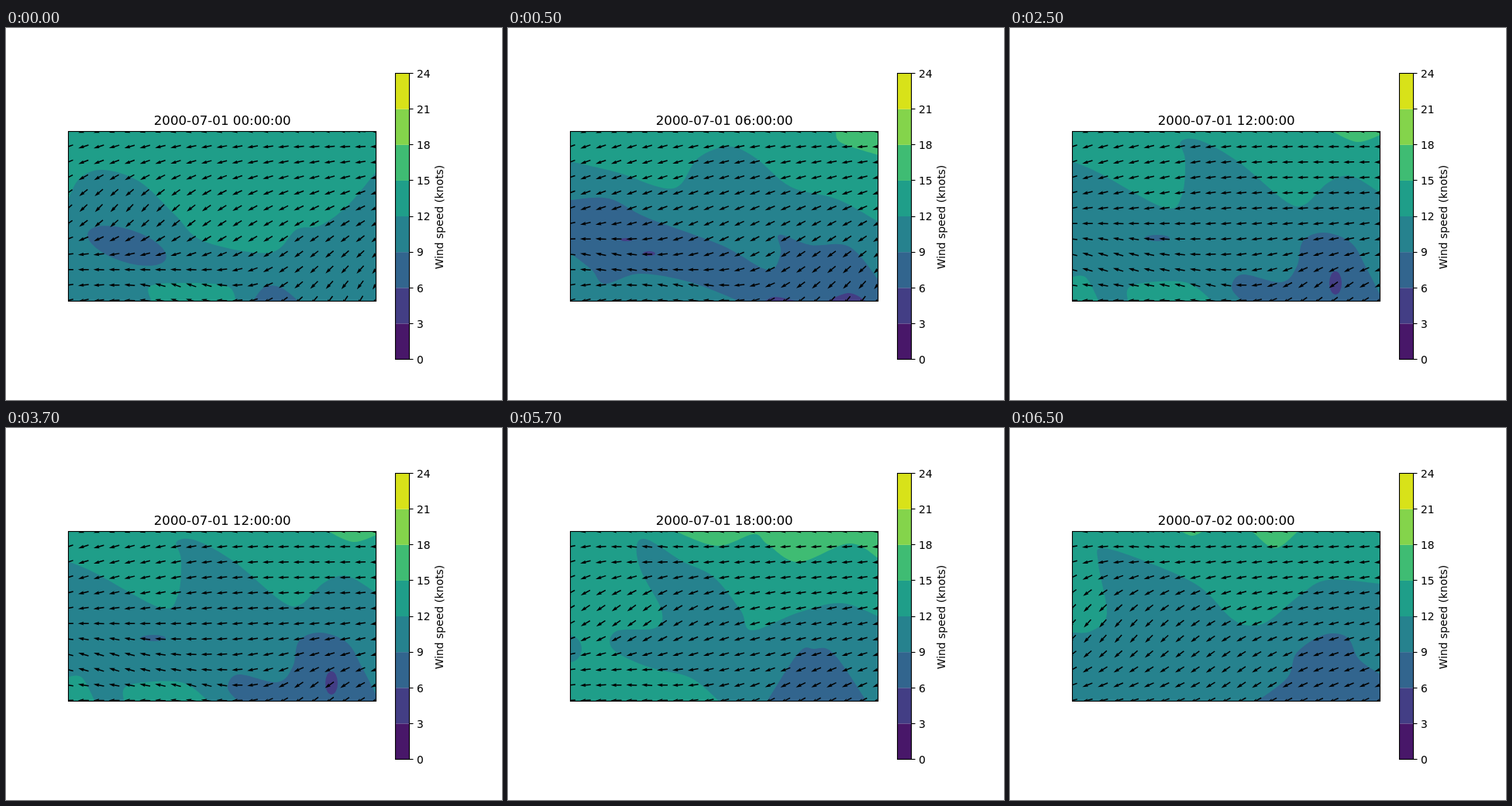
These frames come from a looping animation (640x480 px, 8 s). An HTML page:

```html
<!DOCTYPE html>
<html lang="en">
<head>
<meta charset="utf-8">
<title>Wind speed</title>
<style>
html, body { margin: 0; width: 100%; height: 100%; overflow: hidden; background: #fff; }
svg { display: block; width: 100vw; height: 100vh; overflow: hidden; font: 13.89px "DejaVu Sans", sans-serif; }
.title { font-size: 16.67px; text-anchor: middle; }
.line { fill: none; stroke: #000; stroke-width: 1.11; }
/* The maps stand in one tall strip that jumps by a stage height */
#strip { animation: play 8s step-end infinite; }
@keyframes play {
  0% { transform: translateY(0); }
  6.25% { transform: translateY(-480px); }
  31.25% { transform: translateY(-960px); }
  56.25% { transform: translateY(-1440px); }
  81.25%, 100% { transform: translateY(-1920px); }
}
</style>
</head>
<body>
<svg viewBox="0 0 640 480">
  <defs>
    <clipPath id="map"><rect x="80" y="133.28" width="397.5" height="219"/></clipPath>
    <path id="arrow" d="M-6.95 0L.55-2.25L-.2-.75H6.95V.75H-.2L.55 2.25Z"/>
  </defs>
  <g id="strip"></g>
  <rect class="line" x="80.5" y="133.5" width="397" height="219"/>
  <g id="bar"></g>
  <rect class="line" x="502.5" y="58.5" width="18" height="369"/>
  <text transform="translate(564.4 244) rotate(-90)" text-anchor="middle">Wind speed (knots)</text>
</svg>
<script>
const colors = ['#481769', '#433e85', '#32658e', '#26828e', '#1f9e89', '#3fbc73', '#84d44b', '#d8e219'];
const cell = 19.84;

// Smooth curve through key points; points after "|" close it with straight sides
function area(band, keys) {
  const [curve, corners = ''] = keys.split('|');
  const p = curve.trim().split(' ').map(s => s.split(',').map(Number));
  const at = k => p[Math.max(0, Math.min(p.length - 1, k))];
  let d = 'M' + p[0];
  for (let k = 0; k < p.length - 1; k++) {
    const handle = (m, sign) => at(m).map((v, a) => v + sign * (at(m + 1)[a] - at(m - 1)[a]) / 6);
    d += `C${handle(k, 1)} ${handle(k + 1, -1)} ${at(k + 1)}`;
  }
  if (corners) d += 'L' + corners;
  return `<path d="${d}Z" fill="${colors[band]}"/>`;
}

const blob = (band, x, y, rx, ry, turn = 0) =>
  `<ellipse rx="${rx}" ry="${ry}" transform="translate(${x} ${y}) rotate(${turn})" fill="${colors[band]}"/>`;

const bump = (x, y, rx, ry) => Math.exp(-((x / rx) ** 2) - (y / ry) ** 2);

// wind(i, j): degrees below due left at column i, row j
const steps = [
  {
    base: 4,
    wind: (i, j) => 18 - .8 * i + .3 * i * (j - 1) + 27 * bump(i - 3, j - 5, 7, 2.2)
      - 55 * bump(i - 8, j - 10.5, 5, 2) - 18 * bump(i - 1, j - 8.5, 4, 1.5),
    shapes: [
      area(3, '80,222 95,194 125,183 172,198 217,240 255,275 340,290 375,260 405,255 440,230 478,185|478,353 80,353'),
      area(4, '188,353 186,333 230,329 285,333 297,353'),
      blob(2, 156, 281, 53, 21, 18),
      area(2, '318,353 334,334 355,335 378,353')
    ]
  },
  {
    base: 3,
    wind: (i, j) => 20 - .8 * i + .25 * i * (j - 1)
      - 45 * bump(i - 8, j - 10.5, 5, 2) - 33 * bump(i - 2, j - 8, 4, 1.7),
    shapes: [
      area(4, '80,172 140,186 213,207 245,168 285,153 320,168 365,205 425,221 478,250|478,133 80,133'),
      area(5, '423,133 430,148 478,164|478,133'),
      area(2, '80,222 130,220 180,245 275,280 335,312 352,290 350,267 390,280 440,282 478,325|478,353 80,353'),
      area(3, '80,290 108,312 125,330 170,317 235,328 300,353|80,353'),
      area(1, '330,353 345,347 375,353'),
      area(1, '410,353 440,342 463,353'),
      blob(1, 153, 273, 8, 2),
      blob(1, 182, 291, 8, 3)
    ]
  },
  {
    base: 3,
    wind: (i, j) => 18 - .8 * i + .1 * i * (j - 1) - 36 * bump(i - 2, j - 8.5, 7, 3)
      - 26 * bump(i - 9, j - 10.5, 3.5, 1.5) + 18 * bump(i - 16, j - 10.5, 4, 2) - 8 * bump(i - 14, j - 4, 6, 4),
    shapes: [
      area(4, '80,172 115,187 200,232 222,215 226,170 220,147 245,145 295,173 355,223 380,228 410,200 440,191 478,213|478,133 80,133'),
      area(5, '415,133 448,147 478,138|478,133'),
      area(4, '80,321 98,322 115,353|80,353'),
      area(4, '152,353 158,332 225,328 262,353'),
      blob(2, 190, 271, 16, 4),
      area(2, '300,353 286,335 300,318 350,328 370,308 378,275 405,264 440,277 460,310 478,345|478,353'),
      blob(1, 420, 329, 8, 15)
    ]
  },
  {
    base: 4,
    wind: (i, j) => 5 + .09 * i * (j - 1) + 30 * bump(i - 4, j - 5.5, 6, 2.5) + 10 * bump(i, j - 3, 2, 3)
      - 12 * bump(i - 5, j - 1, 3, 1.5) - 14 * bump(i - 5, j - 10, 3, 1.5) + 10 * bump(i - 15, j - 10.5, 4, 2),
    shapes: [
      area(5, '215,133 270,152 317,137 335,150 375,173 440,149 478,168|478,133'),
      area(3, '273,353 235,322 180,308 135,285 140,262 190,258 198,235 172,185 166,152 180,144 225,172 265,192 300,235 315,261 375,238 430,226 478,243|478,353'),
      blob(3, 80, 285, 15, 17),
      area(2, '334,353 375,290 395,285 420,291 463,353')
    ]
  },
  {
    base: 3,
    wind: (i, j) => 5 + .1 * i * (j - 1) + 42 * bump(i - 2, j - 6.5, 8, 3.5) + 8 * bump(i, j - 4, 2, 2)
      + 14 * bump(i - 11, j - 9.5, 4, 2.5) - 12 * bump(i - 5, j - 1, 3, 1.5),
    shapes: [
      area(4, '80,264 105,262 125,240 114,175 120,155 185,176 245,205 285,245 310,255 335,248 375,215 410,196 478,201|478,133 80,133'),
      area(5, '220,133 235,139 250,133'),
      area(5, '312,133 342,155 372,133'),
      area(2, '318,353 358,322 370,290 405,267 435,270 450,298 478,318|478,353')
    ]
  }
];

function arrows(wind) {
  let out = '';
  for (let j = 0; j <= 11; j++) {
    for (let i = 0; i <= 20; i++) {
      const x = 80 + i * cell, y = 133.28 + j * cell;
      out += `<use href="#arrow" transform="translate(${x} ${y}) rotate(${-wind(i, j)})"/>`;
    }
  }
  return out;
}

// One map every six hours
const stamp = n => new Date(Date.UTC(2000, 6, 1, 6 * n)).toISOString().slice(0, 19).replace('T', ' ');

document.getElementById('strip').innerHTML = steps.map((s, n) => `<g transform="translate(0 ${480 * n})">
  <text class="title" x="279.2" y="125">${stamp(n)}</text>
  <g clip-path="url(#map)">
    <rect x="80" y="133" width="398" height="220" fill="${colors[s.base]}"/>
    ${s.shapes.join('')}
    ${arrows(s.wind)}
  </g></g>`).join('');

let bar = '';
colors.concat('none').forEach((fill, k) => {
  const y = 427.5 - k * 46.125;
  const tick = Math.floor(y) + .5;
  if (k < 8) bar += `<rect x="502.5" y="${y - 46.125}" width="18" height="46.2" fill="${fill}"/>`;
  bar += `<path class="line" d="M520.5 ${tick}h5"/><text x="530" y="${y + 5.3}">${k * 3}</text>`;
});
document.getElementById('bar').innerHTML = bar;
</script>
</body>
</html>
```
